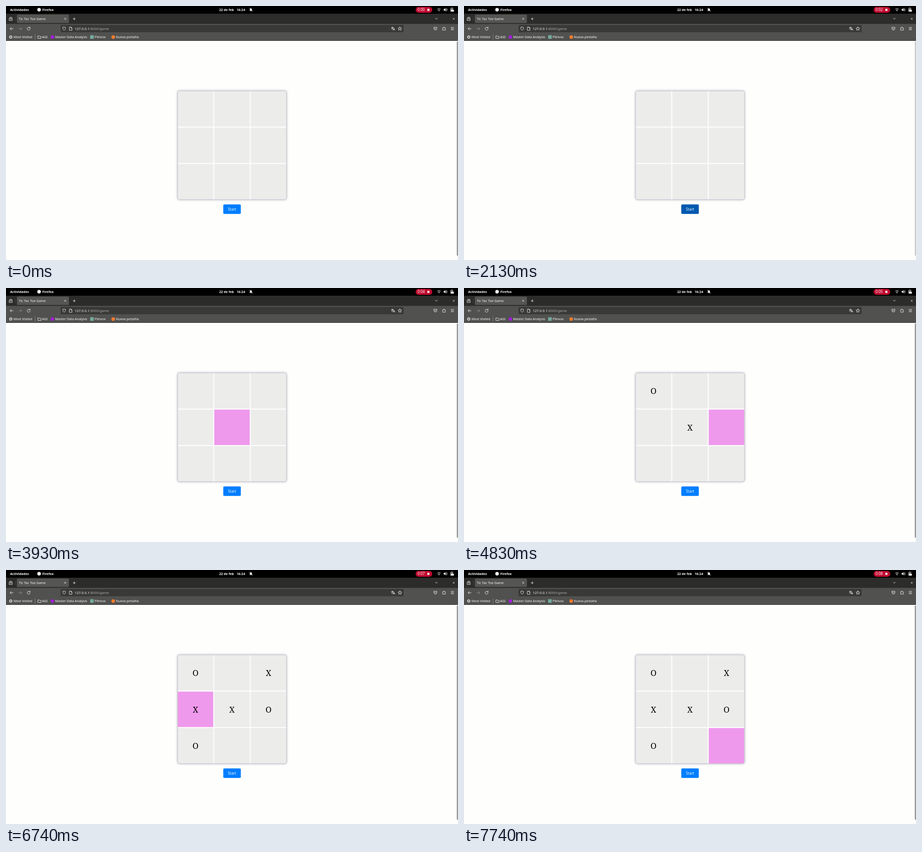
An HTML page for the animation above (8 s loop, 998x561 px).

```html
<!DOCTYPE html>
<html lang="es">
<head>
<meta charset="utf-8">
<title>Tic Tac Toe Game</title>
<style>
  html, body { margin: 0; width: 100%; height: 100%; overflow: hidden; background: #fefefc; }
  svg { display: block; width: 998px; height: 561px; }
  text { font-family: "Noto Sans", sans-serif; font-size: 7.2px; fill: #fbfbfb; white-space: pre; }
  .bold { font-weight: 600; }
  .tab { font-size: 7.4px; }
  .url { font-size: 7.7px; }
  .big { font-size: 8px; }
  .mark { font-family: "Noto Serif", serif; font-size: 18px; fill: #000; text-anchor: middle; }
  .line { fill: none; stroke: #f4f4f4; stroke-width: .9; stroke-linecap: round; stroke-linejoin: round; }
  .solid { fill: #f4f4f4; }
  #board { filter: drop-shadow(0 0 2.5px rgba(0, 0, 40, .32)); }
</style>
</head>
<body>
<svg viewBox="0 0 998 561">
  <defs><clipPath id="rounded"><rect x="379" y="187.6" width="240.2" height="239.8" rx="4"/></clipPath></defs>
  <rect width="998" height="561" fill="#fefefc"/>

  <!-- desktop bar -->
  <rect width="998" height="17" fill="#000"/>
  <text class="bold" x="9" y="10.7">Actividades</text>
  <circle class="solid" cx="73" cy="8.2" r="3.9"/>
  <text class="bold" x="80.3" y="10.7">Firefox</text>
  <text class="bold" x="470.7" y="10.7">22 de feb</text>
  <text class="bold" x="528" y="10.7" text-anchor="end">16:24</text>
  <path class="solid" d="M537.5 10.5q1-1 1-3q0-2.6 2.2-2.6t2.2 2.6q0 2 1 3zM539.8 11.2h1.8q-.9 1.4-1.8 0z"/>
  <path class="line" d="M537.3 4.6l7 7.2"/>
  <rect x="904.4" y="2" width="36.8" height="13" rx="6.5" fill="#c00a2f"/>
  <text class="big" id="timer" x="908.8" y="11"></text>
  <rect class="solid" x="930.3" y="6.2" width="4.6" height="4.6"/>
  <path class="line" d="M952.4 7q3.6-3.2 7.2 0M953.9 8.8q2.1-1.8 4.2 0"/>
  <circle class="solid" cx="956" cy="10.6" r="1"/>
  <path class="solid" d="M966.3 6.8h1.8l2.2-2.2v7.4l-2.2-2.2h-1.8z"/>
  <path class="line" d="M971.6 6.6q1.2 1.7 0 3.4M973 5.2q2.4 3.1 0 6.2"/>
  <path class="line" d="M983.7 4.2h1.6M982.3 5.2h4.6v6.8h-4.6z"/>
  <path class="solid" d="M982.5 7.4h4.2v4.4h-4.2z"/>
  <circle class="solid" cx="987.2" cy="10.4" r="2"/>

  <!-- tab strip -->
  <rect y="17" width="998" height="23" fill="#2c2c2b"/>
  <path class="line" d="M7.4 27h6.4v5h-6.4zM8 25h5.2M9.3 29h2.6"/>
  <path stroke="#555" stroke-width=".5" d="M20.5 23v11"/>
  <rect x="24" y="19" width="115" height="18.6" rx="2.2" fill="#555553"/>
  <text class="tab" x="28.3" y="30.8">Tic Tac Toe Game</text>
  <path class="line" d="M129 26.6l3.4 3.4M132.4 26.6l-3.4 3.4M148.2 28.4h5M150.7 25.9v5M948 27l2.2 2.2l2.2-2.2M987.1 26.8l3 3M990.1 26.8l-3 3"/>

  <!-- navigation and bookmarks -->
  <rect y="39.5" width="998" height="37" fill="#51514f"/>
  <rect y="76" width="998" height=".9" fill="#242424"/>
  <rect x="120.5" y="42" width="757.5" height="16" rx="2.2" fill="#393937"/>
  <path class="line" d="M15.8 50.2h-6.6M12 47.2l-3 3l3 3"/>
  <path class="line" opacity=".4" d="M28 50.2h6.6M31.8 47.2l3 3l-3 3"/>
  <path class="line" d="M52.5 48a3.3 3.3 0 1 0 .8 2.4M53.2 46.3v2.3h-2.3"/>
  <path class="line" d="M128.4 46.3l3.2 1.1q0 4.7-3.2 6.4q-3.2-1.7-3.2-6.4zM140.3 46.5h3.4l2 2v5.2h-5.4zM143.5 46.7v2h2"/>
  <text class="url" x="151.8" y="52.8">127.0.0.1<tspan fill="#aaa">:8000/game</tspan></text>
  <path class="line" d="M851 47.5h4.6M853.2 46.4v1.1M854.6 47.6q-.8 2.6-3.4 3.8M851.7 48.8q1 1.6 2.2 2.2M854.5 53.4l2-4.6l2 4.6M855.2 52h2.6"/>
  <path class="line" d="M869.7 46l1.2 2.6l2.9.3l-2.2 1.9l.7 2.8l-2.6-1.5l-2.6 1.5l.7-2.8l-2.2-1.9l2.9-.3z"/>
  <path class="line" d="M944.8 47h6.6v2.6q-.3 3.6-3.3 3.6t-3.3-3.6zM946.5 49.2l1.6 1.5l1.6-1.5M964 48.3h2v-1.2q1-1.6 2 0v1.2h2.2v5h-6.2v-1.7q2-.8 0-1.8zM982.7 47.3h5.8M982.7 49.9h5.8M982.7 52.5h5.8"/>
  <circle class="line" cx="10.5" cy="68.5" r="2.3" style="stroke-width:1.3"/>
  <circle class="line" cx="10.5" cy="68.5" r="3.4" stroke-dasharray="1 1.67" style="stroke-linecap:butt"/>
  <text x="16.7" y="71.1">Most Visited</text>
  <path stroke="#aaa" stroke-width=".6" d="M64.2 62.5v12"/>
  <path class="line" d="M70.7 66h2.4l1 1.1h3.3v4.6h-6.7z"/>
  <text x="79.8" y="71.1">AGI</text>
  <circle cx="102.5" cy="68.6" r="3.8" fill="#a51be0"/>
  <text x="108.6" y="71.1">Master Data Analysis</text>
  <rect x="185.8" y="64.6" width="8" height="8" rx="1" fill="#74aa9c"/>
  <text x="195.8" y="71.1">Plinvox</text>
  <circle cx="236.7" cy="68.6" r="3.9" fill="#ff7b2b"/>
  <text x="242.6" y="71.1">Nueva pestaña</text>

  <!-- page -->
  <g id="board">
    <rect x="379" y="187.6" width="240.2" height="239.8" rx="4" fill="#fefefe"/>
    <g id="cells" clip-path="url(#rounded)"></g>
    <rect x="379" y="187.6" width="240.2" height="239.8" rx="4" fill="none" stroke="#b5b5c4" stroke-width=".7"/>
  </g>
  <g id="marks"></g>
  <rect id="button" x="479.7" y="438.3" width="38.8" height="21" rx="2.4"/>
  <text class="big" x="499.1" y="451.8" text-anchor="middle">Start</text>
  <rect id="scrollbar" x="995.6" y="78.5" width="2" height="473" rx="1" fill="#777"/>
</svg>
<script>
const LOOP = 8000;
const PITCH = 80.6, SIZE = 78.4;
const $ = id => document.getElementById(id);

// [time, cell]: cell under the pointer from then on
const hovers = [[0, -1], [3700, 7], [3800, 4], [4770, 5], [5070, 2], [6020, 4],
  [6110, 3], [6770, 4], [6805, 7], [7515, 8]];
// [time, cell, mark]
const moves = [[4240, 4, 'X'], [4360, 0, 'O'], [5430, 2, 'X'], [5540, 6, 'O'],
  [6450, 3, 'X'], [6480, 5, 'O']];

function add(parent, tag, attributes) {
  const node = document.createElementNS('http://www.w3.org/2000/svg', tag);
  for (const name in attributes) node.setAttribute(name, attributes[name]);
  return $(parent).appendChild(node);
}

const cellX = i => 379.2 + i % 3 * PITCH;
const cellY = i => 187.9 + Math.floor(i / 3) * PITCH;

const cells = Array.from({ length: 9 }, (_, i) =>
  add('cells', 'rect', { x: cellX(i), y: cellY(i), width: SIZE, height: SIZE }));

const marks = moves.map(([time, i, letter]) => {
  const node = add('marks', 'text', { class: 'mark', x: cellX(i) + SIZE / 2, y: cellY(i) + 46.3 });
  node.textContent = letter;
  return { time, node };
});

const progress = (t, start, length) => Math.min(1, Math.max(0, (t - start) / length));
const ease = p => 1 - (1 - p) ** 2 * (1 + p / 2);
const mix = (from, to, p) => `rgb(${from.map((v, i) => Math.round(v + (to[i] - v) * p))})`;

function draw(t) {
  $('timer').textContent = '0:0' + Math.floor((t + 270) / 1000);

  const hovered = hovers.filter(([time]) => t >= time).pop()[1];
  cells.forEach((cell, i) => cell.setAttribute('fill', i === hovered ? '#ef99ed' : '#ececeb'));
  marks.forEach(({ time, node }) => node.setAttribute('visibility', t >= time ? 'visible' : 'hidden'));

  const darkness = ease(progress(t, 10, 290)) - ease(progress(t, 3670, 290));
  $('button').setAttribute('fill', mix([0, 126, 255], [0, 88, 176], darkness));

  const shown = t < 3660 ? 1 - progress(t, 1910, 420) : 1;
  $('scrollbar').setAttribute('opacity', shown);
}

function tick(now) {
  draw(now % LOOP);
  requestAnimationFrame(tick);
}
draw(0);
requestAnimationFrame(tick);
</script>
</body>
</html>
```
